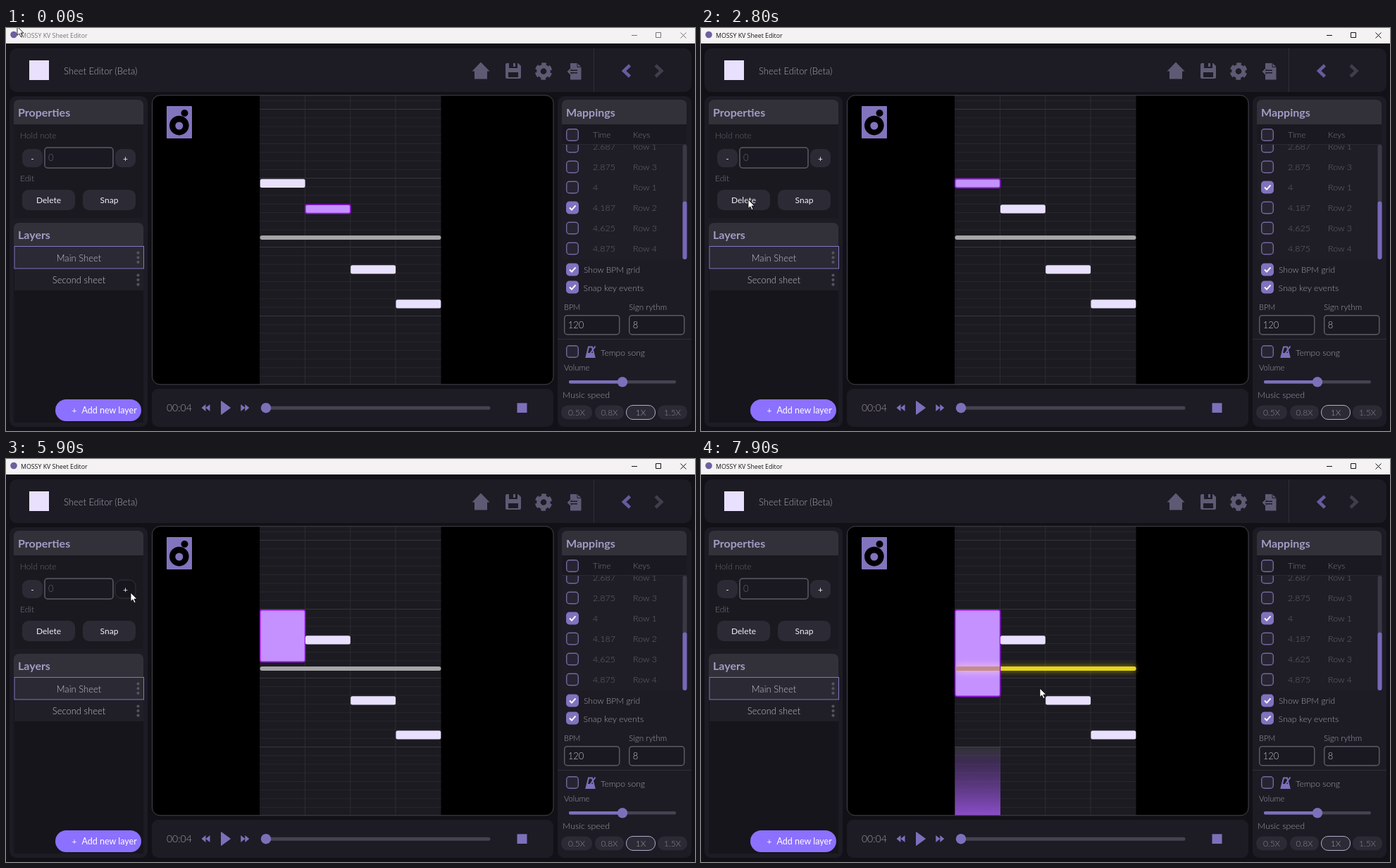
Write an HTML page that moves like this. It is 978 px wide and 573 px high and loops after 8000 ms.

```html
<!DOCTYPE html>
<html lang="en">
<head>
<meta charset="utf-8">
<title>Sheet Editor</title>
<style>
  html, body { margin: 0; width: 100%; height: 100%; overflow: hidden; background: #121118; }
  svg { display: block; width: 978px; height: 573px; }
  text { font-family: Lato, "Open Sans", sans-serif; font-weight: 300; white-space: pre; }
  .bold { font-weight: 700; }
  .mid { font-weight: 400; }
  .sys { font-family: "Open Sans", "Noto Sans", sans-serif; font-weight: 400; }
  .note { fill: #e8e0fc; }
  .note.on { fill: #c491ff; stroke: #9c12ea; stroke-width: 1.6; }
  .check path { visibility: hidden; }
  .check rect { fill: #272431; stroke: #74689f; stroke-width: 1.4; }
  .check.on path { visibility: visible; }
  .check.on rect { fill: #8172bf; stroke: #8172bf; }
</style>
</head>
<body>
<svg id="stage" viewBox="0 0 978 573" xmlns="http://www.w3.org/2000/svg"></svg>
<script>
const STEP = 12.25, LOOP = 8000;
const PURPLE = '#7d70ba', ICON = '#5f5a74', PANEL = '#1d1b24', BUTTON = '#2c2a34';
const DIM = '#66646f', SOFT = '#a19eaa', BRIGHT = '#c3c0cc';

const text = (x, y, size, str, fill, cls = '', anchor = 'start') =>
  `<text x="${x}" y="${y}" font-size="${size}" fill="${fill}" class="${cls}" text-anchor="${anchor}">${str}</text>`;
const box = (x, y, w, h, r, fill, extra = '') =>
  `<rect x="${x}" y="${y}" width="${w}" height="${h}" rx="${r}" fill="${fill}" ${extra}/>`;
const path = (d, fill, extra = '') => `<path d="${d}" fill="${fill}" ${extra}/>`;
const line = (d, stroke, width = 1) => path(d, 'none', `stroke="${stroke}" stroke-width="${width}"`);
const dot = (x, y, r, fill) => `<circle cx="${x}" cy="${y}" r="${r}" fill="${fill}"/>`;
const list = (n, fn) => Array.from({ length: n }, (_, i) => fn(i)).join('');

const check = (y, on, id = '') =>
  `<g class="check ${on ? 'on' : ''}" id="${id}">${box(795.7, y - 8.3, 16.6, 16.6, 4, '')}` +
  line(`M800 ${y}l3 3.2 5.5-6.2`, '#fff', 1.9) + '</g>';
const heading = (x, y, w, h, str) =>
  path(`M${x} ${y + h}v${8 - h}q0-8 8-8h${w - 16}q8 0 8 8v${h - 8}z`, '#323139') +
  text(x + 6, y + h / 2 + 6, 16, str, '#a49bc5', 'bold');
const button = (x, y, w, h, str, id = '') =>
  `<rect id="${id}" x="${x}" y="${y}" width="${w}" height="${h}" rx="9" fill="${BUTTON}"/>` +
  text(x + w / 2, y + h / 2 + 4.5, 12, str, '#f0eef5', 'mid', 'middle');
const field = (x, y, w, h, str, fill) =>
  box(x, y, w, h, 4, '#1a1820', 'stroke="#5c5a65" stroke-width="1.5"') +
  text(x + 5, y + h / 2 + 4.6, 13, str, fill);

function titleBar() {
  return box(0, 0, 978, 22, 0, '#f5f2f4') + dot(11, 9.5, 4.8, '#6b61a0') +
    `<g id="caption">${text(21, 13.6, 8.8, 'MOSSY KV Sheet Editor', 'currentColor', 'sys')}` +
    line('M888 10.5h8M922.5 6.5h7v7h-7zM957.5 6.5l8 8m0-8l-8 8', 'currentColor') + '</g>';
}

function header() {
  const gear = `<g fill="none" stroke="${ICON}" transform="rotate(13 763 61.5)"><circle cx="763" cy="61.5" r="7" stroke-width="5.5"/>` +
    '<circle cx="763" cy="61.5" r="10.2" stroke-width="4" stroke-dasharray="6.5 4.18"/></g>';
  const out = 'M811 62h-13m4-4l-4 4 4 4';
  return box(5, 29, 968, 62, 10, PANEL) + line('M834.5 29v62', '#302e38') +
    box(33, 46, 28, 28, 0, '#e8e0fc') +
    text(82, 66.4, 13, 'Sheet Editor (Beta)', '#a9a6b2') +
    path('M674 48.5l12.5 13h-3.500v11h-18v-11h-3.500z', ICON) +
    path('M709 52q0-2 2-2h16l4 4v16q0 2-2 2h-18q-2 0-2-2zM714 50v7h12v-7h-3v5h-3v-5zM713 63v7h14v-7z', ICON, 'fill-rule="evenodd"') +
    gear + path('M801 50h10l5.5 5.5v18h-15.5z', ICON) + line('M811 50v5.5h5.5', PANEL) +
    line(out, PANEL, 5) + line(out, ICON, 2) +
    line('M885.5 53l-8.5 8 8.5 8', '#675b9e', 4.5) + line('M922 53l8.5 8-8.5 8', '#413e4b', 4.5);
}

function leftPanel() {
  const dots = y => list(3, i => dot(187.5, y + i * 6.6, 2.1, '#55535f'));
  return box(5, 97, 196, 470, 9, PANEL) + box(11, 137, 184, 133, 0, '#15141a') +
    heading(11, 102, 184, 35, 'Properties') +
    '<g id="props">' + box(11, 137, 184, 133, 0, '#1a1920') +
    text(20, 156.5, 12, 'Hold note', DIM) +
    button(23, 172, 29, 26, '-') + field(55, 170, 97, 29, '0', DIM) + button(155, 172, 29, 26, '+', 'plus') +
    text(20, 217.5, 12, 'Edit', '#7b7984') +
    button(23, 230, 75, 29, 'Delete') + button(109, 230, 75, 29, 'Snap') + '</g>' +
    box(11, 310, 184, 251, 0, '#16151b') + heading(11, 277, 184, 33, 'Layers') +
    box(12, 310.5, 183.5, 31.5, 0, '#2b2934', 'stroke="#8277c4"') +
    text(103.5, 331.5, 13, 'Main Sheet', BRIGHT, '', 'middle') + dots(319.7) +
    box(12, 343, 183, 30, 0, '#201f27') +
    text(103.5, 363, 13, 'Second sheet', BRIGHT, '', 'middle') + dots(351.5) +
    box(70, 528, 122, 31, 15.5, '#8c70ff') +
    text(97, 548, 12, '+', '#fff', 'mid', 'middle') + text(107.5, 548, 12.5, 'Add new layer', '#fff', 'mid');
}

function board() {
  const beat = i => line(`M360 ${115.5 + (i - 1) * STEP}h257.5`, (i + 7) % 8 ? '#28272e' : '#37363d');
  const note = (col, y, id = '') =>
    `<rect class="note" id="${id}" x="${360.7 + col * 64.25}" y="${y}" width="63.9" height="12.4" rx="2.5"/>`;
  return box(207.5, 95.8, 569.5, 411, 11, '#000') +
    '<g clip-path="url(#boardClip)">' + box(360, 96, 257.5, 411, 0, '#1c1b21') +
    list(34, beat) + list(3, i => line(`M${424.5 + i * 64.25} 96v411`, '#2d2c33')) +
    box(360.5, 409, 64.5, 98, 0, 'url(#trail)', 'id="trailBox" opacity="0"') + '</g>' +
    box(207.5, 95.8, 569.5, 411, 11, 'none', 'stroke="#46444c"') +
    box(228, 111, 36, 46, 1, '#8274bd') + dot(253.5, 121, 5, '#000') + dot(245.8, 138.6, 13.8, '#000') + dot(245.8, 139, 5.5, '#8274bd') +
    box(360.5, 295, 257, 6, 3, '#a5a5a7') +
    '<g id="glow" opacity="0"><g clip-path="url(#glowClip)">' + box(360.5, 294, 257, 8, 4, '#e8d818', 'filter="url(#blur)" opacity=".5"') +
    '</g>' + box(360.5, 295, 257, 6, 3, '#e6d61a') + '</g>' +
    note(0, 214.7, 'first') + note(1, 251.2, 'second') + note(2, 337.2) + note(3, 386.2) +
    '<g id="through" opacity="0" clip-path="url(#laneClip)">' +
    box(362, 290.5, 66, 15, 6, '#e0b2f2', 'filter="url(#blur)" opacity=".9"') + box(361.5, 295, 70, 6, 3, '#c58c88') + '</g>';
}

function player() {
  const rew = 'M289.5 535v10l-6-5zM283.5 535v10l-6-5z';
  return box(207, 513, 570, 54, 9, PANEL) +
    text(228, 545.3, 14, '00:04', SOFT) + path(rew, PURPLE) +
    path(rew, PURPLE, 'transform="translate(622.8 0) scale(-1 1)"') +
    path('M305.5 530.5l13 9.5-13 9.5z', PURPLE, `stroke="${PURPLE}" stroke-linejoin="round"`) +
    box(368, 537.7, 319.5, 5, 2.5, '#454350') + dot(369, 540.2, 7.2, PURPLE) + box(725.5, 533.3, 14, 13.7, 0, PURPLE);
}

function rightPanel() {
  const rows = ['2.687 1', '2.875 3', '4 1', '4.187 2', '4.625 3', '4.875 4'];
  const row = i => {
    const [time, key] = rows[i].split(' '), y = 168.5 + i * 29;
    return check(y, false, 'row' + i) + text(833, y + 4.6, 12.5, time, DIM) + text(890, y + 4.6, 12.5, 'Row ' + key, DIM);
  };
  const chips = [['0.5X', 788, 44], ['0.8X', 836, 41], ['1X', 880.5, 41], ['1.5X', 925, 42]];
  const chip = ([str, x, w], i) =>
    box(x, 536.5, w, 20, 9.5, BUTTON, i === 2 ? 'stroke="#b3adc8"' : '') +
    text(x + w / 2, 550.8, 12, str, i === 2 ? SOFT : '#8a8793', '', 'middle');
  return box(783, 97, 190, 470, 9, PANEL) + box(789, 137, 177, 29, 0, '#1a1820') +
    box(789, 166, 177, 163, 0, '#1f1d26') + heading(789, 102, 177, 35, 'Mappings') +
    check(152, false) + text(833, 156.3, 12, 'Time', '#777580') + text(890, 156.3, 12, 'Keys', '#777580') +
    line('M789 165.5h177', '#2b2932') +
    `<g clip-path="url(#listClip)">${list(6, row)}</g>` +
    box(960.5, 166, 6, 163, 3, '#3b3945') + box(960.5, 246.5, 6, 82.5, 3, '#7668b8') +
    check(343.5, true) + text(820, 348.3, 12, 'Show BPM grid', SOFT) +
    check(368.5, true) + text(819.5, 373.6, 12.4, 'Snap key events', SOFT) +
    text(792, 401.3, 11, 'BPM', SOFT) + text(884, 401.3, 11.7, 'Sign rythm', SOFT) +
    field(792.7, 408.7, 78, 27, '120', BRIGHT) + field(884.7, 408.7, 78, 27, '8', BRIGHT) +
    line('M783 442.5h190', '#302e38') + check(460, false) +
    line('M827 453.5h5l3.5 14.5h-12z', PURPLE, 2) + path('M824.5 462h9.500l1.500 6h-12.500z', PURPLE) +
    line('M829 463l7.5-10.5', PURPLE, 2) +
    text(844, 466, 12.1, 'Tempo song', SOFT) + text(792, 487, 11.2, 'Volume', SOFT) +
    box(799, 501, 152, 4.5, 2, '#454350') + box(799, 501, 76, 4.5, 2, PURPLE) + dot(875, 503.3, 7.2, PURPLE) +
    text(790, 525.5, 12.4, 'Music speed', SOFT) + chips.map(chip).join('');
}

const defs = `<defs>
  <clipPath id="boardClip"><rect x="207.5" y="95.8" width="569.5" height="411" rx="11"/></clipPath>
  <clipPath id="listClip"><rect x="783" y="166" width="176" height="163"/></clipPath>
  <clipPath id="laneClip"><rect x="361.5" y="215" width="62.5" height="125"/></clipPath>
  <clipPath id="glowClip"><rect x="360" y="280" width="261" height="36"/></clipPath>
  <linearGradient id="trail" x2="0" y2="1"><stop stop-color="#77717f" stop-opacity=".22"/>
    <stop offset=".2" stop-color="#5c3a80" stop-opacity=".5"/>
    <stop offset="1" stop-color="#8f4fd0" stop-opacity=".97"/></linearGradient>
  <filter id="blur" x="-20%" y="-300%" width="140%" height="700%"><feGaussianBlur stdDeviation="4"/></filter>
</defs>`;
const arrow = path('M0 0v12.4l2.9-2.5 2.1 4.7 2.1-.9-2.1-4.6h4z', '#fff', 'id="cursor" stroke="#000" stroke-width=".8"');
document.getElementById('stage').innerHTML = defs + box(0, 0, 978, 573, 0, '#121118') +
  titleBar() + header() + leftPanel() + board() + player() + rightPanel() + arrow;

// Pointer stops: time in units of 100 ms, x, y
const stops = [
  [0, 16, -2], [1, 16, -2], [5, 190, 120], [9, 416, 309], [10, 416, 309], [12, 385, 341], [14, 356, 333],
  [15, 356, 333], [18, 415, 310], [19, 447, 280], [22, 374, 225], [26, 374, 225], [27, 210, 247], [28, 67, 244],
  [29, 67, 244], [32, 13, 200], [35, 55, 118], [37, 120, 150], [38, 100, 175], [40, 2, 119], [42, 165, 218],
  [43, 157, 200], [44, 157, 200], [48, 177, 190], [64, 177, 190], [67, 430, 249], [69, 457, 262],
  [72, 457, 262], [75, 505, 295], [77, 497, 336], [79, 481, 326], [80, 481, 326]
];
const clicks = [5300, 5400, 5500, 5600, 5700, 6000, 6200, 6400, 6500];
const ids = ['caption', 'props', 'plus', 'first', 'second', 'row2', 'row3', 'trailBox', 'glow', 'through', 'cursor'];
const parts = Object.fromEntries(ids.map(id => [id, document.getElementById(id)]));

function pointer(t) {
  const u = t / 100, i = stops.findIndex(s => s[0] > u);
  const [a, x, y] = stops[i - 1], [b, x2, y2] = stops[i], k = (u - a) / (b - a);
  return `translate(${x + (x2 - x) * k} ${y + (y2 - y) * k})`;
}

function draw(now) {
  const t = Math.floor((now % LOOP) / 100) * 100; // the screen updates ten times a second
  const lit = Math.min(1, Math.max(0, (t - 5900) / 300));
  const pressed = t >= 5200 && t < 6500;
  parts.caption.style.color = t < 900 ? '#77757a' : '#151515';
  parts.props.style.display = t < 1000 || t >= 2400 ? '' : 'none';
  parts.second.classList.toggle('on', t < 1000);
  parts.first.classList.toggle('on', t >= 2400);
  parts.row3.classList.toggle('on', t < 1100);
  parts.row2.classList.toggle('on', t >= 2500);
  parts.plus.setAttribute('fill', pressed ? '#18161d' : BUTTON);
  parts.plus.setAttribute('stroke', pressed ? '#34323d' : 'none');
  parts.first.setAttribute('height', 12.4 + STEP * clicks.filter(c => c <= t).length);
  for (const id of ['trailBox', 'glow', 'through']) parts[id].setAttribute('opacity', lit);
  parts.cursor.setAttribute('transform', pointer(t));
}

let start;
function tick(now) {
  start ??= now;
  draw(now - start);
  requestAnimationFrame(tick);
}
draw(0);
requestAnimationFrame(tick);
</script>
</body>
</html>
```
